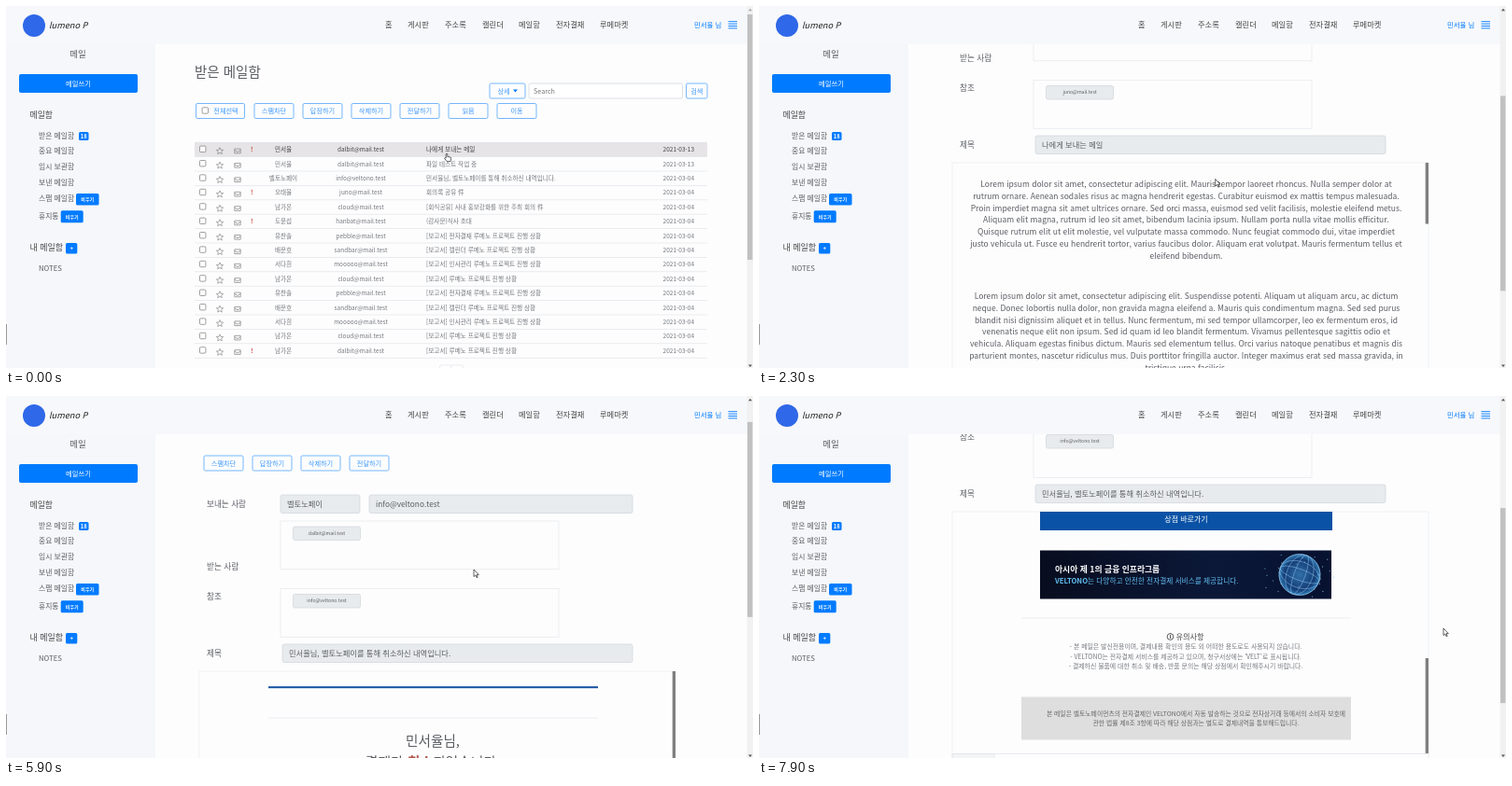
Recreate the animation shown at these times as an HTML page. Size 800x388 px, loop 8000 ms.

```html
<!DOCTYPE html>
<html lang="ko">
<head>
<meta charset="utf-8">
<title>메일</title>
<style>
html, body { margin: 0; width: 100%; height: 100%; overflow: hidden; background: #fdfdfe; }
svg { display: block; }
text { font-family: "Noto Sans CJK KR", "Noto Sans CJK", "Noto Sans", sans-serif; white-space: pre; }
</style>
</head>
<body>
<svg id="stage" width="100%" height="100%" viewBox="0 0 800 388"></svg>
<script>
const BLUE = '#007bff', INK = '#5a5d61', SOFT = '#74777b', LINE = '#e1e4e8';
const ME = '민서율', MY_MAIL = 'dalbit@mail.test';
const SHOP_MAIL = 'info@veltono.test', SHOP_TITLE = ME + '님, 벨토노페이를 통해 취소하신 내역입니다.';

// Text is placed by its vertical centre.
const text = (x, y, s, size, fill = INK, anchor = 'start', weight = 400, more = '') =>
  `<text x="${x}" y="${y + size * 0.35}" font-size="${size}" fill="${fill}" text-anchor="${anchor}" font-weight="${weight}" ${more}>${s}</text>`;
const mid = (x, y, s, size, fill, weight) => text(x, y, s, size, fill, 'middle', weight);
const rect = (x, y, w, h, fill, stroke = 'none', r = 0, more = '') =>
  `<rect x="${x}" y="${y}" width="${w}" height="${h}" rx="${r}" fill="${fill}" stroke="${stroke}" stroke-width=".7" ${more}/>`;
const rule = (x, y, w, color = LINE, h = 0.7) => rect(x, y - h / 2, w, h, color);
const outline = (x, y, w, s, cx = x + w / 2, h = 16) =>
  rect(x, y, w, h, '#fdfdfe', '#3c98fb', 1.6) + mid(cx, y + h / 2, s, 7.2, '#3c98fb');
const check = (x, y) => rect(x - 3.2, y - 3.2, 6.4, 6.4, '#fff', '#777', 1);

const defs = `<defs>
  <path id="star" d="M0-3.7 1-1.2 3.7-1 1.7.7 2.3 3.3 0 1.9-2.3 3.3-1.7.7-3.7-1-1-1.2Z" fill="none" stroke="#777" stroke-width=".6"/>
  <path id="envelope" d="M-3.2-2.3H3.2V2.4H-3.2ZM-3.2-.9 0 1 3.2-.9" fill="none" stroke="#777" stroke-width=".65"/>
  <linearGradient id="night"><stop stop-color="#080d1f"/><stop offset=".6" stop-color="#0b1838"/><stop offset="1" stop-color="#071130"/></linearGradient>
  <radialGradient id="globe"><stop stop-color="#3f8fd0"/><stop offset=".75" stop-color="#184a8c"/><stop offset="1" stop-color="#3fa0e0"/></radialGradient>
</defs>`;

function header() {
  const nav = [[406, '홈'], [430, '게시판'], [470, '주소록'], [510, '캘린더'], [549, '메일함'], [589, '전자결재'], [636, '루메마켓']];
  return rect(0, 0, 794, 41, '#f7f8fb') +
    '<circle cx="30" cy="21" r="12" fill="#2f68e8"/>' +
    text(46, 20.5, 'lumeno P', 9.2, '#222', 'start', 400, 'font-style="italic"') +
    nav.map(([x, s]) => text(x, 20, s, 8.25, '#444')).join('') +
    text(737, 20.5, ME + ' 님', 7.4, BLUE) +
    [16.7, 19.1, 21.5, 23.9].map(y => rule(773.5, y, 9.5, BLUE, 0.9)).join('');
}

function sidebar() {
  const boxes = [['받은 메일함', 139], ['중요 메일함', 155.7], ['임시 보관함', 172.5], ['보낸 메일함', 189], ['스팸 메일함', 206.7], ['휴지통', 225]];
  const badge = (x, y, w, h, s, size = 5) => rect(x, y, w, h, BLUE, 'none', 1.6) + mid(x + w / 2, y + h / 2, s, size, '#fff', 700);
  return rect(0, 41, 160, 347, '#f5f7fa') +
    mid(77, 52, '메일', 9.5) +
    rect(14, 73, 127, 20, BLUE, 'none', 2) + mid(77.5, 83, '메일쓰기', 7.3, '#fff') +
    text(25.5, 117, '메일함', 8.9, '#444') +
    boxes.map(([s, y]) => text(35, y, s, 7.8)).join('') +
    badge(78, 135, 10.5, 9, '18', 5.8) + badge(75, 201, 24.5, 12.5, '비우기') + badge(58.7, 219.3, 24, 13, '비우기') +
    text(25.5, 258.5, '내 메일함', 9, '#444') + badge(64, 254, 12.3, 11.5, '+', 6) +
    text(35, 281, 'NOTES', 7.7) + rect(0, 341, 1, 22, '#999');
}

const ROW_TOP = 146.2, ROW_H = 15.4;
const report = s => `[보고서] ${s}루메노 프로젝트 진행 상황`;
const team = [
  ['유찬솔', 'pebble', report('전자결재 ')], ['배문호', 'sandbar', report('캘린더 ')],
  ['서다흰', 'mooooo', report('인사관리 ')], ['남가온', 'cloud', report('')]
];
const rows = [
  [ME, 'dalbit', '나에게 보내는 메일', 1], [ME, 'dalbit', '파일 테스트 작업 중'],
  ['벨토노페이', SHOP_MAIL, SHOP_TITLE], ['오태율', 'juno', '회의록 공유 件', 1],
  ['남가온', 'cloud', '[회식공유] 사내 홍보강화를 위한 주최 회의 件'], ['도윤섭', 'hanbat', '(감사문)식사 초대', 1],
  ...team, ...team, ['남가온', 'dalbit', report(''), 1]
];

function listRow([name, mail, title, urgent], i) {
  const y = ROW_TOP + ROW_H * (i + 0.5);
  return check(210.7, y - 0.6) +
    `<use href="#star" x="229" y="${y + 1.5}"/><use href="#envelope" x="248" y="${y + 1.5}"/>` +
    (urgent ? mid(263.3, y, '!', 6.8, '#c8453c', 700) : '') +
    mid(297, y, name, 6.6, SOFT) +
    mid(380, y, mail.includes('@') ? mail : mail + '@mail.test', 6.45, SOFT) +
    text(450, y, title, 6.62, SOFT) +
    text(737, y, i < 2 ? '2021-03-13' : '2021-03-04', 6.5, SOFT, 'end') +
    rule(202, y + ROW_H / 2, 549);
}

function listPage() {
  const actions = ['스팸차단', '답장하기', '삭제하기', '전달하기', '읽음', '이동'];
  return text(202, 71, '받은 메일함', 14.5) +
    outline(518, 83, 38, '상세', 533) + `<path d="M543 89.6h5l-2.5 3Z" fill="${BLUE}"/>` +
    rect(560, 83, 164.5, 16, '#fff', '#ced4da', 1.8) + text(565, 91, 'Search', 7.2, '#777') +
    outline(728.5, 83, 22.5, '검색') +
    outline(203.5, 104.5, 52, '전체선택', 235.5) + check(213.3, 112) +
    actions.map((s, i) => outline(266 + 52 * i, 104.5, 42, s)).join('') +
    rect(202, 0, 549, ROW_H, '#e6e4e6', 'none', 0, 'id="hover"') +
    rule(202, ROW_TOP, 549) + rows.map((r, i) => `<g class="row">${listRow(r, i)}</g>`).join('') +
    rect(464.5, 385, 25, 14, '#fff', LINE, 2) + rect(476.3, 385, 0.8, 4, LINE);
}

const loremA = ['Lorem ipsum dolor sit amet, consectetur adipiscing elit. Mauris tempor laoreet rhoncus. Nulla semper dolor at',
  'rutrum ornare. Aenean sodales risus ac magna hendrerit egestas. Curabitur euismod ex mattis tempus malesuada.',
  'Proin imperdiet magna sit amet ultrices ornare. Sed orci massa, euismod sed velit facilisis, molestie eleifend metus.',
  'Aliquam elit magna, rutrum id leo sit amet, bibendum lacinia ipsum. Nullam porta nulla vitae mollis efficitur.',
  'Quisque rutrum elit ut elit molestie, vel vulputate massa commodo. Nunc feugiat commodo dui, vitae imperdiet',
  'justo vehicula ut. Fusce eu hendrerit tortor, varius faucibus dolor. Aliquam erat volutpat. Mauris fermentum tellus et',
  'eleifend bibendum.'];
const loremB = ['Lorem ipsum dolor sit amet, consectetur adipiscing elit. Suspendisse potenti. Aliquam ut aliquam arcu, ac dictum',
  'neque. Donec lobortis nulla dolor, non gravida magna eleifend a. Mauris quis condimentum magna. Sed sed purus',
  'blandit nisi dignissim aliquet et in tellus. Nunc fermentum, mi sed tempor ullamcorper, leo ex fermentum eros, id',
  'venenatis neque elit non ipsum. Sed id quam id leo blandit fermentum. Vivamus pellentesque sagittis odio et',
  'vehicula. Aliquam egestas finibus dictum. Mauris sed elementum tellus. Orci varius natoque penatibus et magnis dis',
  'parturient montes, nascetur ridiculus mus. Duis porttitor fringilla auctor. Integer maximus erat sed massa gravida, in',
  'tristique urna facilisis.'];

const loremBody = () => [loremA, loremB, loremA].map((p, k) =>
  p.map((s, i) => mid(457.5, 22.8 + 120 * k + 12.9 * i, s, 8.5, INK)).join('')).join('');

function banner() {
  const ring = r => `<ellipse rx="${r}" ry="22"/><ellipse rx="22" ry="${r}"/>`;
  let dots = '';
  for (let i = 0; i < 26; i++) {
    const a = i * 2.4, r = 20 + (i * 7) % 26;
    dots += `<circle cx="${(Math.cos(a) * r).toFixed(1)}" cy="${(Math.sin(a) * r * 0.55).toFixed(1)}" r=".6"/>`;
  }
  return rect(301, 444.5, 312, 52, 'url(#night)') +
    `<g transform="translate(579 470.5)"><circle r="22" fill="url(#globe)" opacity=".75"/>
     <g fill="none" stroke="#9fd8ff" stroke-width=".5" opacity=".8" transform="rotate(20)">${ring(22)}${ring(14)}${ring(6)}</g>
     <g fill="#8fd0ff" opacity=".8">${dots}</g></g>` +
    text(317, 464.5, '아시아 제 1의 금융 인프라그룹', 8.8, '#fff', 'start', 700) +
    text(317, 477.5, '<tspan font-weight="700">VELTONO</tspan>는 다양하고 안전한 전자결제 서비스를 제공합니다.', 7.7, '#62bdf0');
}

function receiptBody() {
  const details = [['구매자명', ME], ['상품명', '(ORBA)캡슐커피(Decaf Espresso) (R)미송'], ['취소요청일시', '2021년 03월 01일 15시 17분'],
    ['주문번호', 'COMETS_PAY_DELIVERY_25522990965'], ['결제수단', '신용카드 취소(NV한울)'], ['취소금액', '39,800원']];
  const notes = ['- 본 메일은 발신전용이며, 결제내용 확인의 용도 외 어떠한 용도로도 사용되지 않습니다.',
    "- VELTONO는 전자결제 서비스를 제공하고 있으며, 청구서상에는 'VELT'로 표시됩니다.",
    '- 결제하신 물품에 대한 취소 및 배송, 반품 문의는 해당 상점에서 확인해주시기 바랍니다.'];
  return rule(281, 17.2, 353, '#1553a0', 2) + rule(281, 50, 353) +
    mid(457, 74.5, ME + '님,', 14.6) +
    mid(457, 98, '결제가 <tspan font-weight="700" fill="#b0564c">취소</tspan>되었습니다.', 14.8) +
    rule(281, 122, 353) +
    mid(457.5, 141.5, '고객님이 <tspan font-weight="700">모람 주식회사</tspan>에서 VELTONO 결제서비스를 통해 취소하신 내역입니다.', 7.8, SOFT) +
    mid(457.5, 166, '결제정보', 8.4, '#333', 700) + rule(301, 177.2, 313, '#555', 1) +
    details.map(([k, v], i) => mid(327, 189.7 + 15.1 * i, k, 6.8, SOFT) + text(614, 189.7 + 15.1 * i, v, 7, '#222', 'end')).join('') +
    rule(301, 277, 313) +
    rect(301, 401.5, 313, 21.5, '#0a52a5') + mid(457.5, 411.5, '상점 바로가기', 8, '#fff') +
    banner() + rule(281, 517, 353) +
    '<circle cx="440.5" cy="537" r="3.4" fill="none" stroke="#333" stroke-width=".8"/>' + mid(440.5, 537, 'i', 5.6, '#333', 700) +
    text(446.5, 536.7, '유의사항', 8.2, '#444') +
    notes.map((s, i) => mid(457, 548 + 10.3 * i, s, 6.88, SOFT)).join('') +
    rect(281, 601.5, 353, 46, '#dfdedf') +
    mid(468, 619.5, '본 메일은 벨토노페이먼츠의 전자결제인 VELTONO에서 자동 발송하는 것으로 전자상거래 등에서의 소비자 보호에', 6.82, '#666') +
    mid(468, 629.7, '관한 법률 제8조 3항에 따라 해당 상점과는 별도로 결제내역을 통보해드립니다.', 6.82, '#666');
}

const BODY_TOP = 330, BODY_H = 259.5;

function mailPage(mail) {
  const field = (x, y, w, s) => rect(x, y, w, 19.5, '#e8ebee', '#ced4da', 2) + text(x + 7, y + 9.9, s, 8.25);
  const people = (y, s) => rect(294, y, 298, 51.8, '#fdfdfe', '#e6e8ec') +
    rect(307.5, y + 6, 72, 14.5, '#e8ebee', '#ced4da', 1.8) + mid(343.5, y + 13.2, s, 5.1);
  const label = (y, s) => text(215, y, s, 8.6);
  const fileX = [256, 289, 326, 356, 393, 429.5, 472.5, 509];
  return text(202, 67, '받은 메일함', 14.5) +
    ['스팸차단', '답장하기', '삭제하기', '전달하기'].map((s, i) => outline(212 + 52 * i, 99, 42, s)).join('') +
    label(151, '보내는 사람') + field(294, 141, 85, mail.name) + field(389, 141, 282, mail.from) +
    people(169, MY_MAIL) + label(218, '받는 사람') +
    people(241.5, mail.cc) + label(250, '참조') +
    label(311, '제목') + field(296, 301, 375, mail.title) +
    rect(207, BODY_TOP, 510, BODY_H, '#fdfdfe', '#e8eaee') +
    `<svg x="0" y="${BODY_TOP}" width="800" height="${BODY_H}"><g class="inner">${mail.body()}</g></svg>` +
    rect(713.7, BODY_TOP, 3.3, mail.thumb, '#7f7f7f', 'none', 0, 'class="thumb"') +
    rect(207, 589.3, 510, 19.2, '#fdfdfe', LINE) + rect(207, 589.3, 45, 19.2, '#f2f4f6', LINE) +
    text(214.5, 599, '첨부파일', 8.2) +
    mail.files.map((s, i) => text(fileX[i], 599, s, 6.55, '#222')).join('') +
    rect(444, 635.4, 36, 15.8, BLUE, 'none', 2, 'class="back"') + mid(461.9, 643.2, '목록으로', 7.3, '#fff');
}

const mails = [
  { name: ME, from: MY_MAIL, cc: 'juno@mail.test', title: '나에게 보내는 메일', body: loremBody, thumb: 65.5,
    files: ['단풍.JPG', '소나무.jpg', '바다.jpg', '민들레.jpg', '강아지.jpg', '무지개1.JPG', '고양이.jpg', '구름.jpg'] },
  { name: '벨토노페이', from: SHOP_MAIL, cc: SHOP_MAIL, title: SHOP_TITLE, body: receiptBody, thumb: 102.5, files: [] }
];

const stage = document.getElementById('stage');
stage.innerHTML = defs + rect(0, 0, 800, 388, '#fdfdfe') +
  [listPage(), ...mails.map(mailPage)].map(s => `<g class="page">${s}</g>`).join('') +
  sidebar() + header() +
  rect(793.5, 0, 6.5, 388, '#f1f1f1') + rect(794, 9, 5.5, 263, '#c1c1c1', 'none', 0, 'id="bar"') +
  '<path id="up" d="M795 5.2h4l-2-2.4Z"/><path d="M795 384.6h4l-2 2.4Z" fill="#555"/>' +
  '<path id="arrow" d="M0 0V7.6L1.8 6 3 8.7 4.2 8.2 3 5.6H5.3Z" fill="#fff" stroke="#222" stroke-width=".7"/>' +
  '<path id="hand" d="M-.8 5V.6Q0-.5.8.6V3.4L4 4.1Q4.8 4.4 4.7 5.4L4 8.6H.2L-2.4 5.4Q-2.2 4.2-.8 5Z" fill="#fff" stroke="#222" stroke-width=".7"/>';

const $ = s => stage.querySelector(s);
const pages = [...stage.querySelectorAll('.page')];
const rowTexts = [...stage.querySelectorAll('.row')].map(r => r.querySelectorAll(`text[fill="${SOFT}"]`));
const back = pages[1].querySelector('.back');
const inner = pages[2].querySelector('.inner'), thumb = pages[2].querySelector('.thumb');

// Keys: [time, value...]
const pointerKeys = [[0, 472, 158], [500, 474, 160], [900, 488.7, 185.5], [3200, 488.7, 185.5], [3600, 460, 335], [3800, 460, 335],
  [4000, 470, 275], [4200, 488, 95], [4400, 501, 186], [6600, 501, 186], [6800, 591, 247], [7100, 715, 150],
  [7600, 716, 290], [7700, 720, 300], [7900, 733, 249]];
const scrollKeys = [
  [[0, 0]],
  [[1300, 0], [1400, 5], [1800, 51], [2100, 125], [2200, 125], [2300, 162], [2700, 255], [3100, 306]],
  [[5600, 0], [5900, 35], [6500, 170], [6800, 206]]
];
const innerKeys = [[7100, 0], [7600, 360], [7700, 403]];

function at(keys, t) {
  const i = keys.findIndex(k => k[0] > t);
  if (i === 0) return keys[0].slice(1);
  if (i < 0) return keys[keys.length - 1].slice(1);
  const a = keys[i - 1], b = keys[i], p = (t - a[0]) / (b[0] - a[0]);
  return a.slice(1).map((v, j) => v + (b[j + 1] - v) * p);
}

function draw(t) {
  const view = t < 400 || (t >= 3800 && t < 5200) ? 0 : t < 3800 ? 1 : 2;
  const [x, y] = at(pointerKeys, t), [scroll] = at(scrollKeys[view], t), [depth] = at(innerKeys, t);
  pages.forEach((p, i) => {
    p.setAttribute('display', i === view ? 'inline' : 'none');
    p.setAttribute('transform', `translate(0 ${i === view ? -scroll : 0})`);
  });

  const row = Math.floor((y - ROW_TOP) / ROW_H), onRow = view === 0 && row >= 0 && row < rows.length;
  $('#hover').setAttribute('y', ROW_TOP + ROW_H * row);
  $('#hover').setAttribute('visibility', onRow ? 'visible' : 'hidden');
  rowTexts.forEach((list, i) => list.forEach(e => e.setAttribute('fill', onRow && i === row ? '#444' : SOFT)));

  const onBack = view === 1 && t >= 3600, pressed = onBack && t >= 3700;
  back.setAttribute('fill', pressed ? '#0062cc' : onBack ? '#0069d9' : BLUE);
  back.setAttribute('stroke', pressed ? '#80bdff' : 'none');
  back.setAttribute('stroke-width', 1.6);

  inner.setAttribute('transform', `translate(0 ${-depth})`);
  thumb.setAttribute('y', BODY_TOP + depth * 157 / 403);

  $('#bar').setAttribute('y', 9 + scroll * 165 / 306);
  $('#bar').setAttribute('height', view ? 209 : 263);
  $('#up').setAttribute('fill', scroll > 0 ? '#555' : '#aaa');

  const hand = onRow || onBack;
  for (const id of ['arrow', 'hand']) {
    $('#' + id).setAttribute('display', (id === 'hand') === hand ? 'inline' : 'none');
    $('#' + id).setAttribute('transform', `translate(${x} ${y})`);
  }
}

function tick() {
  draw(Math.floor(performance.now() % 8000 / 100) * 100);
  requestAnimationFrame(tick);
}
tick();
</script>
</body>
</html>
```
